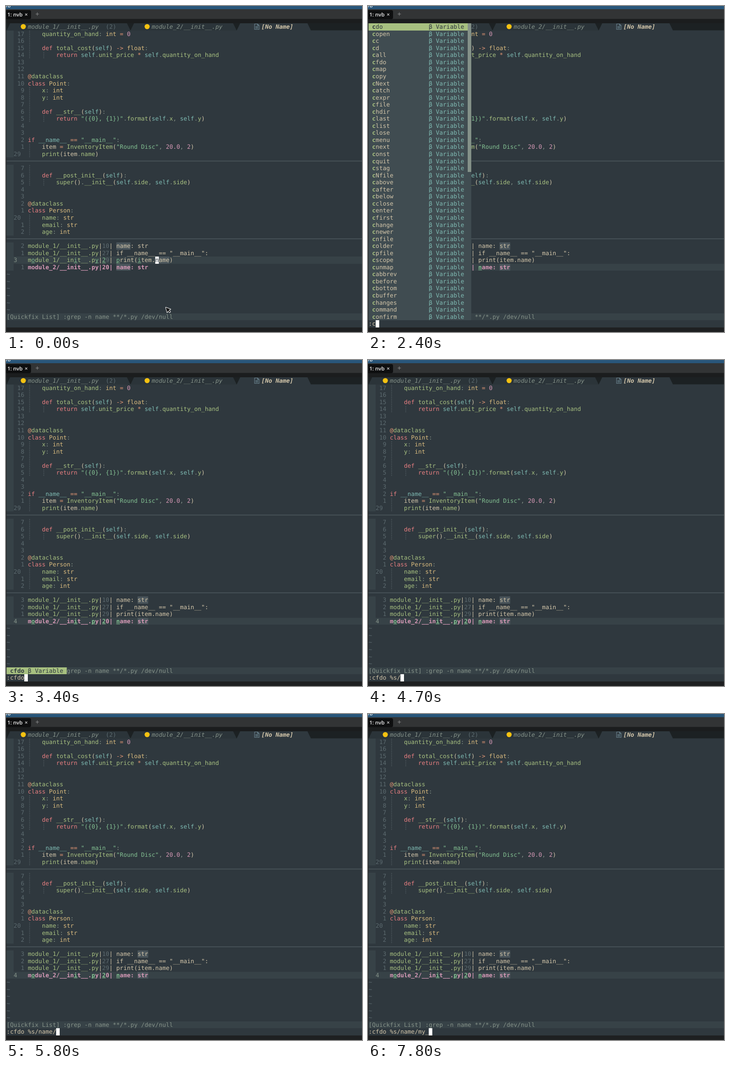
Recreate the animation shown at these times as an HTML page with a canvas. Size 782 px wide and 717 px high, loop 8 s.

```html
<!DOCTYPE html>
<html lang="en">
<head>
<meta charset="utf-8">
<title>Editor session</title>
<style>
html, body { margin: 0; width: 100%; height: 100%; overflow: hidden; background: #1e2021; }
canvas { display: block; }
</style>
</head>
<body>
<canvas id="stage" width="782" height="717"></canvas>
<script>
const ctx = document.getElementById("stage").getContext("2d");
const W = 782, H = 717, LOOP = 8000;
const LEFT = 1.3, TOP = 38, CELL_W = 7.775, CELL_H = 15.55, BASELINE = 12.1;
const MONO = '12.915px "DejaVu Sans Mono", monospace';
const SANS = '"Open Sans", "Noto Sans", sans-serif';

const C = {
  bg: "#2f383e", gutter: "#374247", line: "#374247", menu: "#404c51", mark: "#4a555b",
  dark: "#1e2021", fg: "#d3c6aa", red: "#e67e80", orange: "#e69875", yellow: "#dbbc7f",
  green: "#a7c080", aqua: "#83c092", blue: "#7fbbb3", purple: "#d699b6",
  grey: "#859289", dim: "#5c6a6f", guide: "#59656a", cursor: "#ffffff"
};

// [row, line number, source text]
const CODE = [
  [1, 17, "    quantity_on_hand: int = 0"],
  [2, 16, ""],
  [3, 15, "    def total_cost(self) -> float:"],
  [4, 14, "        return self.unit_price * self.quantity_on_hand"],
  [5, 13, ""],
  [6, 12, ""],
  [7, 11, "@dataclass"],
  [8, 10, "class Point:"],
  [9, 9, "    x: int"],
  [10, 8, "    y: int"],
  [11, 7, ""],
  [12, 6, "    def __str__(self):"],
  [13, 5, '        return "({0}, {1})".format(self.x, self.y)'],
  [14, 4, ""],
  [15, 3, ""],
  [16, 2, 'if __name__ == "__main__":'],
  [17, 1, '    item = InventoryItem("Round Disc", 20.0, 2)'],
  [18, 29, "    print(item.name)"],
  [20, 7, ""],
  [21, 6, "    def __post_init__(self):"],
  [22, 5, "        super().__init__(self.side, self.side)"],
  [23, 4, ""],
  [24, 3, ""],
  [25, 2, "@dataclass"],
  [26, 1, "class Person:"],
  [27, 20, "    name: str"],
  [28, 1, "    email: str"],
  [29, 2, "    age: int"]
];
const CURRENT_ROWS = [18, 27];
const GUIDED_BLANKS = [2, 11, 20];

const RULES = [
  [/"[^"]*"/y, C.aqua],
  [/\d+(\.\d+)?/y, C.purple],
  [/(def|class|return|if)\b/y, C.red],
  [/(int|float|str|Point|Person)\b/y, C.yellow],
  [/(self|__name__)\b/y, C.blue],
  [/item\b/y, C.fg],
  [/\w+/y, C.green],
  [/->|[=*@]+/y, C.orange],
  [/[:.,]/y, C.grey],
  [/./y, C.fg]
];

const FIX_FILE = "/__init__.py";
const FIXES = [
  ["module_1", 10, "name: str"],
  ["module_1", 27, 'if __name__ == "__main__":'],
  ["module_1", 29, "print(item.name)"],
  ["module_2", 20, "name: str"]
];
const FIX_ROW = 31;

const C_ITEMS = ("cdo copen cc cd call cfdo cmap copy cNext catch cexpr cfile chdir clast clist close " +
  "cmenu cnext const cquit cstag cNfile cabove cafter cbelow cclose center cfirst change cnewer " +
  "cnfile colder cpfile cscope cunmap cabbrev cbefore cbottom cbuffer changes command confirm").split(" ");
const CF_ITEMS = ("cfdo cfile cfirst cNfile cafter cnfile cpfile cbefore cbuffer confirm " +
  "caddfile cgetfile caddbuffer cgetbuffer").split(" ");

const TYPED = ":cfdo %s/name/my_";
// Start time of each typed character
const KEY_TIMES = [1200, 2400, 3000, 3200, 3400, 3500, 4200, 4500, 4700,
  5300, 5400, 5500, 5600, 5800, 6800, 7100, 7800];
const MENUS = [
  { from: 2400, to: 3000, items: C_ITEMS, query: "c", width: 15, thumb: 21 },
  { from: 3000, to: 3300, items: CF_ITEMS, query: "cf", width: 10 },
  { from: 3300, to: 3600, items: ["cfdo"], query: "cfdo", width: 4 }
];

const colX = col => LEFT + col * CELL_W;
const rowY = row => TOP + row * CELL_H;

function rect(x, y, w, h, color) {
  ctx.fillStyle = color;
  ctx.fillRect(x, y, w, h);
}

function cells(col, row, cols, color, rows = 1) {
  const y = Math.round(rowY(row));
  rect(colX(col), y, cols * CELL_W, Math.round(rowY(row + rows)) - y, color);
}

function fullRow(row, color) {
  const y = Math.round(rowY(row));
  rect(LEFT, y, W - LEFT, Math.round(rowY(row + 1)) - y, color);
}

function poly(points, color) {
  ctx.fillStyle = color;
  ctx.beginPath();
  points.forEach(([x, y]) => ctx.lineTo(x, y));
  ctx.closePath();
  ctx.fill();
}

// Terminal text: one glyph per grid cell. Returns the next free column.
function put(text, col, row, color, style = "") {
  ctx.font = style + " " + MONO;
  ctx.fillStyle = color;
  for (const ch of text) {
    if (ch !== " ") ctx.fillText(ch, colX(col), rowY(row) + BASELINE);
    col++;
  }
  return col;
}

function label(text, x, y, font, color) {
  ctx.font = font;
  ctx.fillStyle = color;
  ctx.fillText(text, x, y);
}

function drawWindowBar() {
  rect(0, 0, W, 7, "#29567a");
  label("vb", -3, 2.5, "600 11.5px " + SANS, "#e8eef2");
  rect(0, 7, W, 22, "#323435");
  rect(0, 28.5, W, 10, "#1b1d1e");
  ctx.fillStyle = "#0e0f10";
  ctx.beginPath();
  ctx.roundRect(-6, 9, 61, 20, 4);
  ctx.fill();
  label("1: nvb", 3, 23, "600 11.5px " + SANS, "#f2f2f2");
  label("×", 41, 23, "600 12px " + SANS, "#d8d8d8");
  label("+", 64.5, 23, "15px " + SANS, "#8c8e8f");
}

function drawTab(start, end, color) {
  const top = TOP, bottom = Math.round(rowY(1));
  poly([[colX(start), bottom], [colX(start + 1), top], [colX(end - 1), top], [colX(end), bottom]], color);
}

function dot(x, y) {
  ctx.fillStyle = "#f5c211";
  ctx.beginPath();
  ctx.arc(x, y, 5.6, 0, Math.PI * 2);
  ctx.fill();
}

function drawTabs() {
  rect(0, TOP, W, CELL_H, "#1c2123");
  drawTab(0, 35, "#2b3439");
  drawTab(35, 65, "#2b3439");
  drawTab(65, 86, C.bg);
  dot(38, 45.3);
  put("module_1" + FIX_FILE, 6, 0, C.grey, "italic");
  put("(2)", 28, 0, C.dim);
  dot(310, 45.3);
  put("module_2" + FIX_FILE, 41, 0, C.grey, "italic");
  drawFileIcon(546, 39.5);
  put("[No Name]", 72, 0, C.fg, "italic bold");
}

function drawFileIcon(x, y) {
  ctx.strokeStyle = "#6d8792";
  ctx.lineWidth = 1.1;
  ctx.beginPath();
  ctx.moveTo(x + 6.5, y);
  ctx.lineTo(x, y);
  ctx.lineTo(x, y + 12);
  ctx.lineTo(x + 10, y + 12);
  ctx.lineTo(x + 10, y + 3.5);
  ctx.lineTo(x + 6.5, y);
  ctx.lineTo(x + 6.5, y + 3.5);
  ctx.lineTo(x + 10, y + 3.5);
  for (const dy of [5.5, 7.5, 9.5]) {
    ctx.moveTo(x + 2, y + dy);
    ctx.lineTo(x + 8, y + dy);
  }
  ctx.stroke();
}

function drawGuide(col, row) {
  const x = colX(col) + CELL_W / 2 - 0.5, step = CELL_H / 4;
  for (let i = 0; i < 4; i++) rect(x, rowY(row) + i * step + 0.7, 1, 2.3, C.guide);
}

function drawNumber(n, row, current, color = C.dim) {
  const text = String(n);
  put(text, current ? 2 : 5 - text.length, row, color);
}

function drawCodeLine([row, number, text]) {
  drawNumber(number, row, CURRENT_ROWS.includes(row));
  const indent = GUIDED_BLANKS.includes(row) ? 4 : text.search(/\S|$/);
  for (let i = 0; i < indent; i += 4) drawGuide(6 + i, row);
  for (let at = 0; at < text.length;) {
    for (const [rule, color] of RULES) {
      rule.lastIndex = at;
      const match = rule.exec(text);
      if (!match) continue;
      put(match[0], 6 + at, row, color);
      at += match[0].length;
      break;
    }
  }
}

function drawCode() {
  cells(0, 1, 2, C.gutter, 18);
  cells(0, 20, 2, C.gutter, 10);
  CODE.forEach(drawCodeLine);
  for (const row of [19, 30]) rect(LEFT, rowY(row) + CELL_H / 2 - 0.8, W, 1.1, "#59656a");
}

function drawFixes(t) {
  const active = t < 300 ? 2 : 3;
  const word = active === 2 ? "name" : "str";
  const jumps = active === 2 ? [1, 13, 19, 21, 25, 31] : [1, 13, 18, 21, 25];
  fullRow(FIX_ROW + active, C.line);
  cells(0, FIX_ROW, 2, C.gutter, 4);

  FIXES.forEach(([module, number, text], i) => {
    const row = FIX_ROW + i, on = i === active, last = i === 3;
    const style = last ? "bold" : "";
    const tint = color => last ? C.purple : color;
    const line = `${module}${FIX_FILE}|${number}| ${text}`;
    const hit = new RegExp(`\\b${word}\\b`).exec(text);
    if (hit) cells(31 + hit.index, row, word.length, C.mark);
    drawNumber(on ? i + 1 : Math.abs(i - active), row, on, on ? C.grey : C.dim);

    [...line].forEach((ch, k) => {
      let color = k < 20 ? C.green : k === 21 || k === 22 ? C.dim : C.fg;
      color = tint(color);
      const jump = on && jumps.includes(k);
      if (jump) color = C.aqua;
      put(ch, 6 + k, row, color, style);
      if (jump) rect(colX(6 + k), rowY(row) + 13.4, CELL_W, 1, color);
    });
  });

  if (t < 300) drawCursor(42, 33, "n");
  else if (t < 1200) drawCursor(39, 34, "r", "bold");
  for (let row = 35; row <= 40; row++) put("~", 0, row, C.dim);
}

function drawCursor(col, row, ch = "", style = "") {
  cells(col, row, 1, C.cursor);
  put(ch, col, row, C.bg, style);
}

function drawCommand(t) {
  fullRow(41, C.line);
  put("[Quickfix List] :grep -n name **/*.py /dev/null", 0, 41, C.grey);
  const count = KEY_TIMES.filter(time => time <= t).length;
  if (!count) return;
  put(TYPED.slice(0, count), 0, 42, C.fg);
  drawCursor(count, 42);
}

function drawMenu({ items, query, width, thumb }) {
  const first = 42 - items.length, cols = width + 13;
  cells(0, first, cols + (thumb ? 1 : 0), C.menu, items.length);
  cells(0, first, cols, C.green);
  if (thumb) cells(cols, first, 1, C.grey, thumb);

  items.forEach((item, i) => {
    const row = first + i, picked = i === 0;
    let matched = 0;
    [...item].forEach((ch, k) => {
      const hit = ch === query[matched];
      if (hit) matched++;
      put(ch, 1 + k, row, picked ? C.bg : hit ? C.green : C.fg, hit ? "bold" : "");
    });
    put("β Variable", width + 2, row, picked ? C.bg : C.blue);
  });
}

function drawPointer() {
  ctx.beginPath();
  [[351, 663], [361.5, 667], [357.5, 668.8], [361, 672.5], [359.3, 674], [356, 670.2], [354, 674]]
    .forEach(([x, y]) => ctx.lineTo(x, y));
  ctx.closePath();
  ctx.lineJoin = "round";
  ctx.lineWidth = 2;
  ctx.strokeStyle = "#ffffff";
  ctx.stroke();
  ctx.fillStyle = "#101010";
  ctx.fill();
}

function draw(t) {
  rect(0, 0, W, H, C.dark);
  drawWindowBar();
  rect(LEFT, TOP, W - LEFT, 669, C.bg);
  drawTabs();
  drawCode();
  drawFixes(t);
  drawCommand(t);
  const menu = MENUS.find(m => t >= m.from && t < m.to);
  if (menu) drawMenu(menu);
  if (t < 1200) drawPointer();
}

ctx.textRendering = "geometricPrecision";
const start = performance.now();
function tick() {
  draw((performance.now() - start) % LOOP);
  requestAnimationFrame(tick);
}
tick();
</script>
</body>
</html>
```
